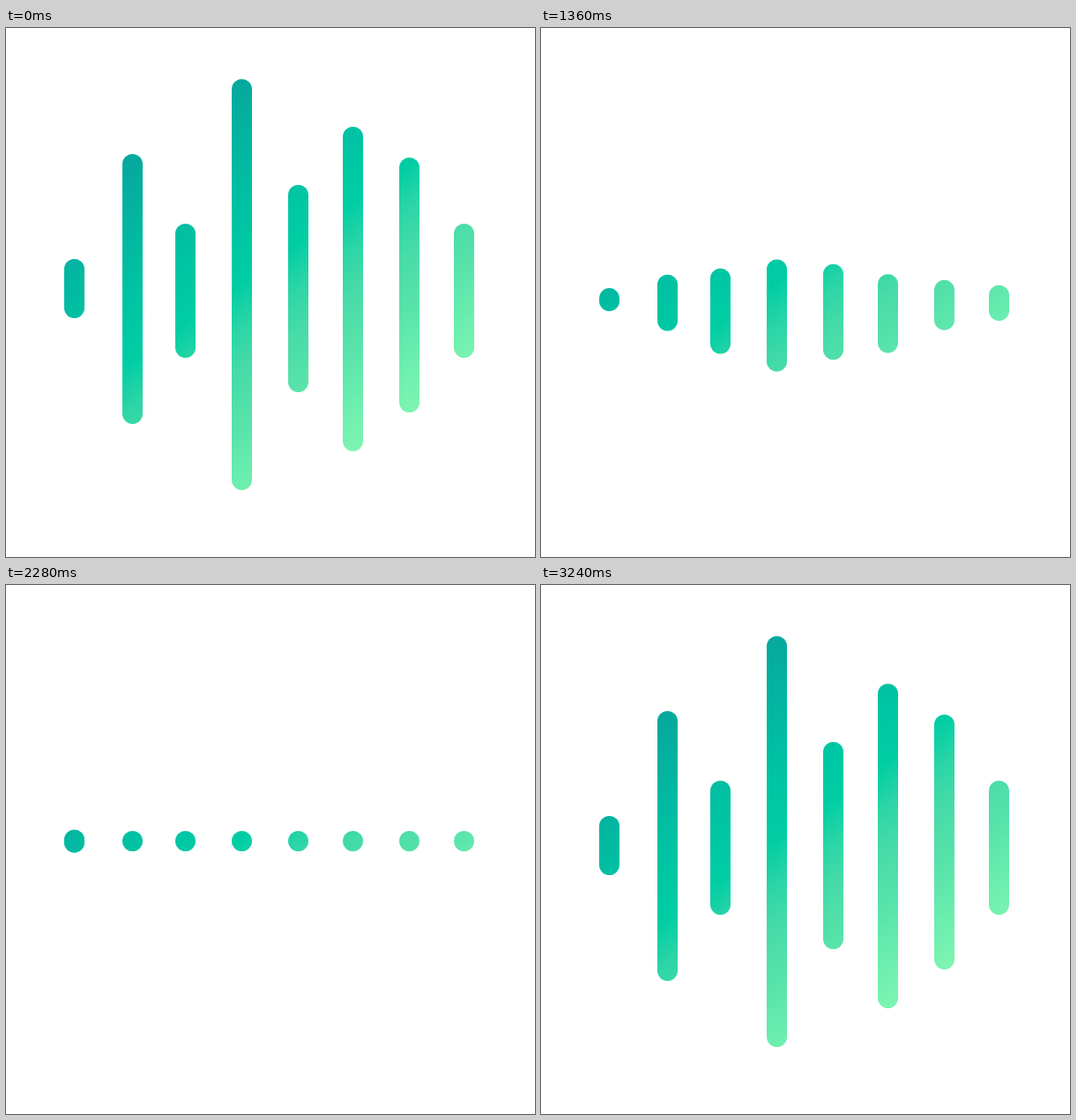
Recreate the animation shown at these times as an HTML page. Size 600x600 px, loop 3.28 s.

```html
<!DOCTYPE html>
<html lang="en">
<head>
<meta charset="utf-8">
<title>Sound bars</title>
<style>
  html, body { margin: 0; width: 100%; height: 100%; overflow: hidden; background: #fff; }
  svg { display: block; width: 100%; height: 100%; }
</style>
</head>
<body>
<svg id="stage" viewBox="0 0 600 600">
  <defs>
    <linearGradient id="mint" gradientUnits="userSpaceOnUse" x1="0" y1="240" x2="246.1" y2="583.8"></linearGradient>
  </defs>
  <g id="bars" fill="url(#mint)"></g>
</svg>
<script>
const NS = 'http://www.w3.org/2000/svg';
const LOOP = 3280, STEP = 40, WIDTH = 23;
const lefts = [66, 132, 192, 256, 320, 382, 446, 508];

// Gradient stops, measured along the diagonal from 240 to 760
const stops = [
  [240, '#06a79d'], [346, '#02b9a1'], [403, '#00c3a3'], [480, '#00cda4'],
  [530, '#2bd5a6'], [580, '#47dba8'], [640, '#57e2aa'], [700, '#69edae'], [760, '#7df4b1']
];

// Each pose: tops, then bottoms, one value per bar
const tall = [[262, 143, 222, 58, 178, 112, 147, 222], [329, 449, 374, 524, 413, 480, 436, 374]];
const falling = [[271, 258, 258, 198, 235, 170, 154, 222], [305, 316, 316, 374, 339, 409, 426, 374]];
const rest = [[278, 283, 280, 278, 279, 282, 283, 290], [303, 318, 319, 317, 315, 314, 308, 314]];
const swell = [[308, 273, 258, 233, 246, 273, 288, 293], [335, 363, 408, 445, 423, 410, 369, 346]];
const ebb = [[267, 263, 257, 246, 264, 265, 269, 270], [321, 310, 319, 330, 313, 314, 309, 315]];
const surge = [[153, 233, 147, 252, 192, 251, 279, 275], [438, 361, 451, 349, 411, 353, 303, 303]];
const dot = [279, 302];
const lift = [0.22, 0.066];

const mix = (a, b, k) => a + (b - a) * k;

// Time and value pairs for one edge (0 top, 1 bottom) of bar i
function track(i, edge) {
  const at = pose => pose[edge][i];
  const height = swell[1][i] - swell[0][i];
  const grown = Math.min(0.98, 1.15 - 0.08 * i);
  return [
    [0, at(tall)],
    [Math.min(555, 330 + 33 * i), at(tall)],
    [560, at(falling)],
    [720 + 160 * i / 7, at(rest)],
    [1120, at(rest)],
    [1560, at(swell)],
    [1660, at(swell) - lift[edge] * height],
    [1920, at(ebb)],
    [2180, dot[edge]],
    [Math.min(2530, 2260 + 45 * i), dot[edge]],
    [2560, at(surge)],
    [2760, mix(at(surge), at(tall), grown)],
    [2820 + 60 * i, at(tall)],
    [LOOP, at(tall)]
  ];
}

// Monotone cubic through the keys, flat at turning points
function curve(keys) {
  const rate = keys.slice(1).map(([t, v], n) => (v - keys[n][1]) / (t - keys[n][0]));
  const slope = keys.map((_, n) => {
    const a = rate[n - 1] || 0, b = rate[n] || 0;
    return a * b > 0 ? 2 * a * b / (a + b) : 0;
  });
  return time => {
    let n = 0;
    while (n < keys.length - 2 && time >= keys[n + 1][0]) n++;
    const [t0, v0] = keys[n], [t1, v1] = keys[n + 1];
    const span = t1 - t0, u = (time - t0) / span, w = 1 - u;
    return v0 * (1 + 2 * u) * w * w + v1 * u * u * (3 - 2 * u)
      + span * u * w * (slope[n] * w - slope[n + 1] * u);
  };
}

function add(parent, name, attrs) {
  const node = document.createElementNS(NS, name);
  for (const key in attrs) node.setAttribute(key, attrs[key]);
  return parent.appendChild(node);
}

const gradient = document.getElementById('mint');
for (const [place, color] of stops) {
  add(gradient, 'stop', { offset: (place - 240) / 520, 'stop-color': color });
}

const group = document.getElementById('bars');
const bars = lefts.map((x, i) => ({
  node: add(group, 'rect', { x, width: WIDTH, rx: WIDTH / 2 }),
  top: curve(track(i, 0)),
  bottom: curve(track(i, 1))
}));

function draw(time) {
  const t = Math.floor(time % LOOP / STEP) * STEP;
  for (const { node, top, bottom } of bars) {
    const y = top(t);
    node.setAttribute('y', y);
    node.setAttribute('height', Math.max(WIDTH, bottom(t) - y));
  }
}

const start = performance.now();
function tick() {
  draw(performance.now() - start);
  requestAnimationFrame(tick);
}
tick();
</script>
</body>
</html>
```
